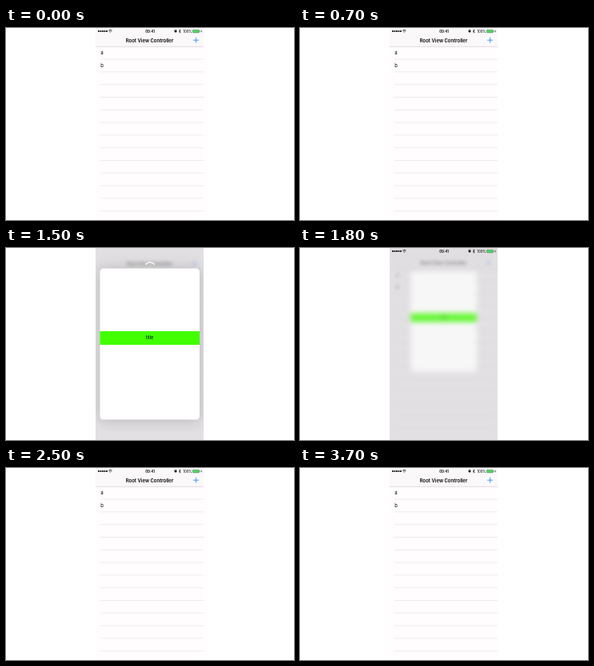
An HTML page for the animation above (3.8 s loop, 360x240 px).

```html
<!DOCTYPE html>
<html lang="en">
<head>
<meta charset="utf-8">
<title>Peek preview</title>
<style>
html, body { margin: 0; height: 100%; overflow: hidden; background: #fff; }
svg { display: block; width: 100vw; height: 100vh; }
text { font-family: Inter, Roboto, sans-serif; }
.mid { text-anchor: middle; }
.bold { font-weight: 600; }
.line { fill: none; stroke: #e2dee1; stroke-width: .6; }
#shade { fill: #d2cfd4; }
#paper { filter: drop-shadow(0 1px 8px rgba(0, 0, 0, .2)); }
</style>
</head>
<body>
<svg viewBox="0 0 360 240">
  <clipPath id="screen"><rect x="112" width="135" height="240"/></clipPath>
  <g clip-path="url(#screen)">
    <rect x="112" width="135" height="240" fill="#fffdfe"/>
    <g id="list">
      <rect x="112" width="135" height="23.3" fill="#fbf8fa"/>
      <path class="line" d="M112 23.4H247" style="stroke:#cbc6ca"/>
      <text class="mid bold" x="179.5" y="17.8" font-size="6">Root View Controller</text>
      <path d="M234.2 15.2h6.8M237.6 11.8v6.8" stroke="#2385f8" stroke-width=".8"/>
      <text x="118.3" y="33.2" font-size="6.1">a</text>
      <text x="118.3" y="49" font-size="6.1">b</text>
      <path id="rows" class="line"/>
    </g>
    <rect id="shade" x="112" width="135" height="240"/>

    <g id="peek">
      <path id="chevron" d="M174.5 20.2Q178.5 17.8 180 17.8T185.5 20.2" fill="none" stroke="#fff" stroke-width="1.6" stroke-linecap="round"/>
      <rect id="paper" x="117.4" y="25.5" width="124.6" height="189" rx="4.5" fill="#fff"/>
      <rect x="117.4" y="104" width="124.6" height="17" fill="#41ff00"/>
      <text class="mid" x="179.5" y="114.3" font-size="5.5">title</text>
    </g>

    <g id="sheet">
      <rect x="117.4" width="124.6" height="41" rx="4.5" fill="#f8f6f9"/>
      <path class="line" d="M117.4 20.5H242"/>
      <text class="mid" x="179.5" y="13" font-size="7.1" fill="#147efb">a</text>
      <text class="mid" x="179.5" y="33.4" font-size="7.1" fill="#d0252b">b</text>
    </g>

    <g id="status">
      <path d="M116 4H127" stroke="#000" stroke-width="2.1" stroke-linecap="round" stroke-dasharray="0 2.5"/>
      <path d="M128.2 3.2q2.2-2 4.4 0M129.1 4.3q1.3-1.1 2.6 0M130 5.3l.4.4.4-.4" fill="none" stroke="#000" stroke-width=".7"/>
      <text class="mid bold" x="180" y="5.7" font-size="4.4">09:41</text>
      <circle cx="212" cy="4.1" r="1.5"/>
      <path d="M210.5 2.7l.9-.9M213.5 2.7l-.9-.9" stroke="#000" stroke-width=".6"/>
      <path d="M216 2.9l2.4 2.2-1.2 1.2V1.7l1.2 1.2L216 5.1" fill="none" stroke="#000" stroke-width=".5"/>
      <text x="221.2" y="5.7" font-size="4.3">100%</text>
      <rect x="233.3" y="2.3" width="8.2" height="3.6" rx=".7" fill="#4cd964" stroke="#555" stroke-width=".4"/>
      <path d="M242.2 3.4v1.4" stroke="#555" stroke-width=".6"/>
      <path d="M244.4 2.2l-1.1 2.1h.8l-.3 1.7 1.1-2.2h-.8z"/>
    </g>
  </g>
</svg>
<script>
const LOOP = 3800, STEP = 100, RISE = 300, FALL = 400;
const peeks = [
  { start: 850, end: 2000 },
  { start: 2500, end: 3600, swipe: 2800 }
];
const el = id => document.getElementById(id);
const clamp = v => Math.min(1, Math.max(0, v));
const show = (id, on) => el(id).style.display = on ? "" : "none";

let rows = "";
for (let y = 39.1; y < 240; y += 15.8) rows += `M118 ${y.toFixed(1)}H247`;
el("rows").setAttribute("d", rows);

function draw(t) {
  const peek = peeks.find(p => t > p.start && t < p.end);
  const grow = peek ? Math.min(clamp((t - peek.start) / RISE), clamp((peek.end - t) / FALL)) : 0;
  const veil = clamp(grow * 2);
  const swipe = peek && peek.swipe ? clamp((t - peek.swipe) / 280) : 0;
  const lift = 75 * (1 - (1 - swipe) ** 2) * grow;

  // The list recedes behind a frosted veil
  const back = 1 - .02 * grow - .02 * veil;
  el("list").setAttribute("transform", `translate(180 120) scale(${back}) translate(-180 -120)`);
  el("list").style.filter = veil ? `blur(${2 * veil}px)` : "none";
  el("shade").style.opacity = .62 * veil;

  // The card grows out of its row, follows the swipe and shrinks back
  const size = .32 + .68 * grow;
  el("peek").setAttribute("transform",
    `translate(179.7 ${64 + 56 * grow - lift}) scale(${size}) translate(-179.7 -120)`);
  el("peek").style.filter = grow < 1 ? `blur(${9 * (1 - grow)}px)` : "none";
  el("peek").style.opacity = clamp(.5 * veil + .5 * grow);
  el("paper").style.filter = grow < 1 ? "none" : "";
  el("sheet").setAttribute("transform", `translate(0 ${270 - lift})`);

  show("peek", grow > 0);
  show("chevron", grow === 1);
  show("sheet", lift > 0);
  show("status", grow < 1);
}

const begin = performance.now();
function tick() {
  const t = (performance.now() - begin) % LOOP;
  draw(Math.floor(t / STEP) * STEP);
  requestAnimationFrame(tick);
}
tick();
</script>
</body>
</html>
```
